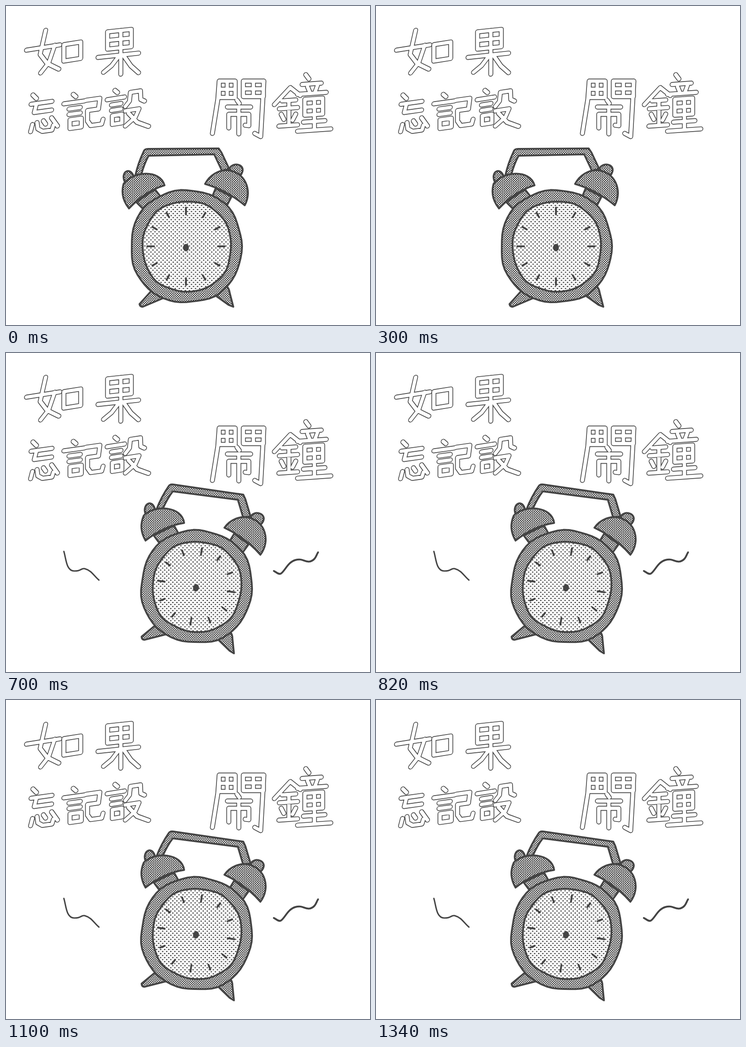
These frames come from a looping animation (799 by 701 pixels, 1.5 s). An HTML page:

```html
<!DOCTYPE html>
<html lang="zh-Hant">
<head>
<meta charset="utf-8">
<title>如果忘記設鬧鐘</title>
<style>
html, body { margin: 0; width: 100%; height: 100%; overflow: hidden; background: #fff; }
svg { display: block; width: 799px; height: 701px; }
path { fill: none; stroke: #444; stroke-linecap: round; stroke-linejoin: round; }
.ink { stroke-width: 4; }
.hub { fill: #444; }
.outer { stroke-width: 10.8; }
.inner { stroke: #fff; stroke-width: 7.6; }
.rest, .left, .right, .buzz { visibility: hidden; animation: 1.5s step-end infinite; }
.rest { animation-name: rest; }
.left { animation-name: left; }
.right { animation-name: right; }
.buzz { animation-name: buzz; }
@keyframes rest {
  0% { visibility: visible; }
  33.333%, 100% { visibility: hidden; }
}
@keyframes left {
  0%, 46.667%, 73.333%, 100% { visibility: hidden; }
  33.333%, 60% { visibility: visible; }
}
@keyframes right {
  0%, 33.333%, 60% { visibility: hidden; }
  46.667%, 73.333%, 100% { visibility: visible; }
}
@keyframes buzz {
  0% { visibility: hidden; }
  33.333%, 100% { visibility: visible; }
}
</style>
</head>
<body>
<svg id="stage" viewBox="0 0 799 701" role="img" aria-label="如果忘記設鬧鐘"></svg>
<script>
// Pen strokes shared by the hand-lettered characters.
const bar = (x, y, w) => `M${x} ${y}h${w}`;
const stem = (x, y, h) => `M${x} ${y}v${h}`;
const dab = (x, y, dx, dy) => `M${x} ${y}l${dx} ${dy}`;

function grid(x, y, w, h, rows = 1, cols = 1) {
  let d = '';
  for (let i = 0; i <= rows; i++) d += bar(x, y + h * i / rows, w);
  for (let i = 0; i <= cols; i++) d += stem(x + w * i / cols, y, h);
  return d;
}

// The radical 言, w wide.
const speech = w => dab(w / 2 - 2, 2, 6, 6) + bar(0, 20, w) + bar(w / 4, 33, w * .55) +
  bar(w / 4, 45, w * .55) + grid(w * .3, 57, w * .55, 19);

// Each character: left, top, upward tilt in degrees, strokes.
const letters = [
  [45, 55, 9, bar(0, 42, 73) + 'M42 5L30 56 45 78 71 95M62 41L49 77 31 97' + grid(82, 43, 37, 36)],
  [202, 51, 6, grid(21, 8, 52, 38, 2) + bar(0, 62, 89) + stem(50, 8, 96) + 'M44 66L30 83 12 96M57 65L72 88 89 105'],
  [55, 195, 8, dab(4, 1, 8, 9) + bar(0, 21, 46) + 'M12 22L7 40H45M13 63L15 77 25 84H46L49 74' +
    dab(3, 66, -4, 15) + dab(27, 61, 5, 8) + dab(45, 57, 13, 20)],
  [127, 195, 8, speech(45) + 'M49 19H79L76 42H52V65L59 76H83L86 66'],
  [222, 186, 9, speech(38) + 'M40 41L49 31 51 12H73L74 31 82 36M40 51H70L62 68 40 84M47 57L66 80 91 93'],
  [468, 165, 0, grid(0, 0, 35, 36, 2, 2) + grid(53, 0, 44, 34, 2, 2) + 'M0 0L-3 40-15 115M98 0L91 122 78 115' +
    dab(39, 42, 5, 7) + bar(18, 57, 51) + stem(43, 57, 59) + 'M21 103V73H65V98L57 97'],
  [585, 150, 4, 'M4 67L39 32 61 51' + bar(21, 60, 30) + bar(15, 77, 40) + bar(14, 115, 41) + stem(36, 60, 54) +
    dab(19, 89, 6, 12) + dab(51, 91, -7, 13) + dab(73, 6, 7, 10) + bar(65, 27, 42) + dab(77, 33, 4, 10) +
    dab(100, 28, -6, 16) + bar(55, 48, 63) + grid(71, 60, 39, 35, 2) + stem(92, 60, 68) + bar(68, 110, 47) + bar(55, 129, 73)]
];

const title = kind => letters.map(([x, y, tilt, d]) =>
  `<path class="${kind}" d="${d}" transform="translate(${x} ${y}) skewY(${-tilt})"/>`).join('');

// Each pose turns the clock about its hub and moves the hub to x, y.
const hub = { x: 395, y: 531 };
const poses = [
  { name: 'rest', ...hub, turn: 0 },
  { name: 'left', x: 378.5, y: 518.5, turn: -8.3 },
  { name: 'right', x: 417, y: 516, turn: 8.6 }
];

// A slightly squared oval with an unsteady pen line.
function oval(cx, cy, rx, ry, seed) {
  const pts = [];
  for (let deg = 0; deg < 360; deg += 6) {
    const a = deg * Math.PI / 180;
    const r = 1 + .03 * Math.sin(2 * a) ** 2 + .007 * Math.sin(7 * a + seed) + .004 * Math.sin(11 * a + 2 * seed);
    pts.push(`${cx + rx * r * Math.cos(a)} ${cy + ry * r * Math.sin(a)}`);
  }
  return `M${pts.join('L')}Z`;
}

// Twelve marks, longer at the quarters.
function ticks() {
  let d = '';
  for (let i = 0; i < 12; i++) {
    const a = i * Math.PI / 6;
    const at = r => `${hub.x + r * Math.sin(a)} ${hub.y - 3 - r * Math.cos(a)}`;
    d += `M${at(i % 3 ? 74 : 70)}L${at(85)}`;
  }
  return `<path class="ink" d="${d}"/>`;
}

// Staggered screen tone that stays level while the clock tilts.
function tone(id, turn, size, rx, ry = rx) {
  const spot = k => `<ellipse cx="${size * k}" cy="${size * k}" rx="${rx}" ry="${ry}" fill="#333"/>`;
  return `<pattern id="${id}" width="${size}" height="${size}" patternUnits="userSpaceOnUse" patternTransform="rotate(${-turn})">
    <rect width="${size}" height="${size}" fill="#fff"/>${spot(.25)}${spot(.75)}</pattern>`;
}

function clock({ name, x, y, turn }) {
  const part = (d, kind = 'mid') => `<path class="ink" d="${d}" style="fill:url(#${kind}-${name})"/>`;
  const handle = 'M284 372Q290 345 302 320 304 314 312 314L467 313 473 322 490 358 474 362 457 326 313 329Q304 345 297 370Z';
  const knobs = 'M261 387C250 366 272 350 281 376ZM490 361C492 340 533 346 515 372Z';
  const necks = 'M286 431L327 403 341 421 304 449ZM460 401L495 419 481 446 451 423Z';
  const leftBell = 'M270 445Q250 420 258 391C278 363 338 358 348 394Q305 407 270 445Z';
  const rightBell = 'M437 391C447 371 468 360 485 361 524 363 542 405 524 438Q485 405 437 391Z';
  const feet = 'M319 626L293 655Q294 661 300 661L345 642ZM483 614Q490 621 491 630L499 661 489 657 461 637Z';
  return `<g class="${name}" transform="translate(${x} ${y}) rotate(${turn}) translate(${-hub.x} ${-hub.y})">
    ${tone('mid-' + name, turn, 5, 1.48)}
    ${tone('deep-' + name, turn, 5, 1.58)}
    ${tone('pale-' + name, turn, 8.9, 1.7, 1.2)}
    ${part(handle) + part(knobs, 'deep') + part(necks)}
    ${part(leftBell, 'deep') + part(rightBell, 'deep') + part(feet)}
    ${part(oval(396, 528, 121, 123, 1)) + part(oval(397, 528.5, 97, 99, 4), 'pale')}
    ${ticks()}
    <ellipse class="hub" cx="${hub.x}" cy="${hub.y}" rx="6.5" ry="8"/>
  </g>`;
}

document.getElementById('stage').innerHTML = `
  ${title('outer')}${title('inner')}
  <g class="buzz">
    <path d="M127 436C132 452 132 478 149 479S164 472 173 474C188 478 193 490 204 499" stroke-width="3"/>
    <path d="M588 479C594 482 598 487 603 485 612 480 618 460 635 455S655 461 668 458C680 454 680 446 685 438" stroke-width="4"/>
  </g>
  ${poses.map(clock).join('')}`;
</script>
</body>
</html>
```
